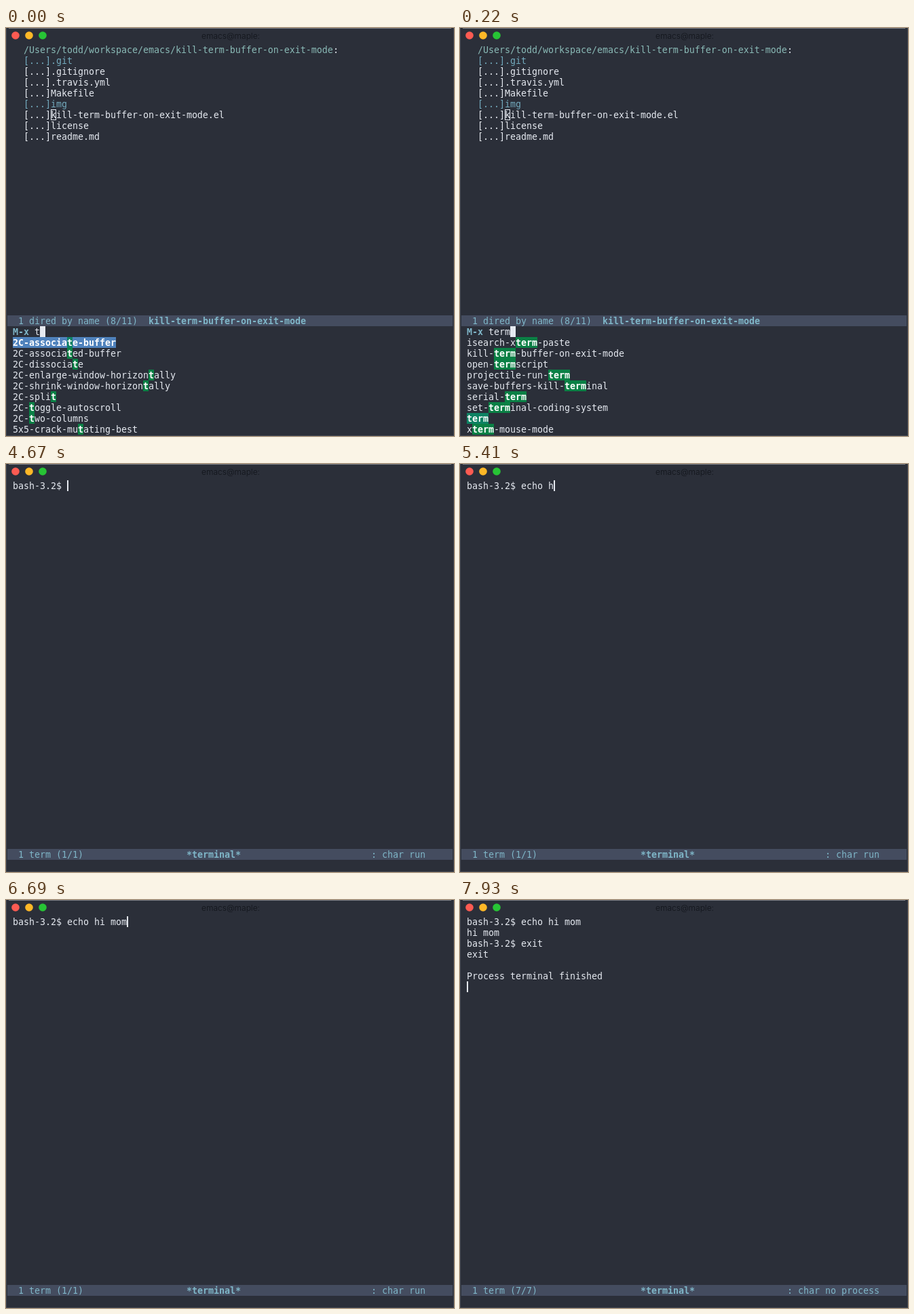
These frames come from a looping animation (660x602 px, 8 s). An HTML page with a canvas:

```html
<!DOCTYPE html>
<html lang="en">
<head>
<meta charset="utf-8">
<title>Terminal session</title>
<style>
html, body { margin: 0; width: 660px; height: 602px; overflow: hidden; background: #2b2f39; }
canvas { display: block; }
</style>
</head>
<body>
<canvas width="660" height="602"></canvas>
<script>
const ctx = document.querySelector('canvas').getContext('2d');
const BG = '#2b2f39', BAR = '#444c5f', FG = '#e5e9f0', BLUE = '#7fb6c8', DIR = '#73aabd',
  PATH = '#8abab6', MATCH = '#0a8045', SELECT = '#4f82bc', WHITE = '#ffffff';
const CELL = 8, LINE = 16;
const MODE = 'kill-term-buffer-on-exit-mode';
const PROMPT = 'bash-3.2$ ';

const px = col => 10 + col * CELL;
const py = row => 24 + row * LINE;

function rect(x, y, w, h, color) {
  ctx.fillStyle = color;
  ctx.fillRect(x, y, w, h);
}

function text(col, row, str, color = FG, bold = false) {
  ctx.font = (bold ? 'bold ' : '') + '13.29px "DejaVu Sans Mono", monospace';
  ctx.fillStyle = color;
  ctx.fillText(str, px(col), py(row) + 13);
}

const block = (col, row, n, color) => rect(px(col), py(row), n * CELL, LINE, color);
const barCursor = (col, row) => rect(px(col), py(row), 2, LINE, FG);
const modeBar = row => rect(2, py(row), 656, LINE, BAR);

function frame() {
  rect(0, 0, 660, 602, BG);
  rect(0, 0, 1, 602, '#434750');
  rect(659, 0, 1, 602, '#434750');
  rect(0, 601, 660, 1, '#434750');
  rect(4, 0, 652, 1, '#7b7e84');
  ['#fc5b52', '#fdb827', '#27c435'].forEach((color, i) => {
    ctx.fillStyle = color;
    ctx.beginPath();
    ctx.arc(14 + 20 * i, 11, 5.8, 0, 7);
    ctx.fill();
  });
  ctx.font = '300 12px Inter, sans-serif';
  ctx.fillStyle = '#11141a';
  ctx.fillText('emacs@maple:', 288, 16);
}

function dired(barRow) {
  const path = '/Users/todd/workspace/emacs/' + MODE;
  text(2, 0, path, PATH);
  text(2 + path.length, 0, ':');
  ['.git', '.gitignore', '.travis.yml', 'Makefile', 'img', MODE + '.el', 'license', 'readme.md']
    .forEach((name, i) => text(2, i + 1, '[...]' + name, i % 4 ? FG : DIR));
  ctx.strokeStyle = FG;
  ctx.lineWidth = 1;
  ctx.strokeRect(66.5, 120.5, 7, 15);
  modeBar(barRow);
  text(1, barRow, '1 dired by name (8/11)', BLUE);
  text(25, barRow, MODE, BLUE, true);
}

function command(query, names, selected) {
  dired(25);
  text(0, 26, 'M-x', BLUE, true);
  text(4, 26, query);
  block(4 + query.length, 26, 1, FG);
  names.forEach((name, i) => {
    const row = 27 + i, at = name.indexOf(query), end = at + query.length, on = i === selected;
    if (on) block(0, row, name.length, SELECT);
    block(at, row, query.length, on ? '#0d8263' : MATCH);
    text(0, row, name.slice(0, at), on ? WHITE : FG, on);
    text(at, row, query, WHITE, true);
    text(end, row, name.slice(end), on ? WHITE : FG, on);
  });
}

function runPrompt() {
  dired(33);
  block(0, 34, 1, FG);
  text(0, 34, 'R', BG, true);
  text(1, 34, 'un program:', BLUE, true);
  text(13, 34, '/bin/bash');
}

function terminal(lines, state = ': char run') {
  const last = lines.length - 1;
  lines.forEach((line, i) => text(0, i, line));
  barCursor(lines[last].length, last);
  modeBar(34);
  text(1, 34, `1 term (${last + 1}/${last + 1})`, BLUE);
  text(32, 34, '*terminal*', BLUE, true);
  text(76 - state.length, 34, state, BLUE);
}

const T_NAMES = ['2C-associate-buffer', '2C-associated-buffer', '2C-dissociate',
  '2C-enlarge-window-horizontally', '2C-shrink-window-horizontally', '2C-split',
  '2C-toggle-autoscroll', '2C-two-columns', '5x5-crack-mutating-best'];
const TER_NAMES = ['ansi-term', 'center-line', 'center-paragraph', 'center-region',
  'checkdoc-interactive', 'checkdoc-message-interactive', 'describe-character-set',
  'find-alternate-file', 'find-alternate-file-other-window'];
const TERM_NAMES = ['isearch-xterm-paste', MODE, 'open-termscript', 'projectile-run-term',
  'save-buffers-kill-terminal', 'serial-term', 'set-terminal-coding-system', 'term',
  'xterm-mouse-mode'];

const ECHO = PROMPT + 'echo hi mom';
const echo = n => () => terminal([ECHO.slice(0, PROMPT.length + n)]);
const exit = n => () => terminal([ECHO, 'hi mom', PROMPT + 'exit'.slice(0, n)]);

const scenes = [
  [0, () => command('t', T_NAMES, 0)],
  [160, () => command('ter', TER_NAMES, 0)],
  [220, () => command('term', TERM_NAMES, 7)],
  [2640, runPrompt],
  [4670, echo(0)], [4830, echo(2)], [4910, echo(4)],
  [5340, echo(5)], [5410, echo(6)],
  [6000, echo(7)], [6100, echo(9)], [6200, echo(10)], [6690, echo(11)],
  [7310, exit(0)], [7490, exit(1)], [7630, exit(2)], [7720, exit(3)],
  [7930, () => terminal([ECHO, 'hi mom', PROMPT + 'exit', 'exit', '',
    'Process terminal finished', ''], ': char no process')],
];

function draw() {
  const t = performance.now() % 8000;
  frame();
  scenes.findLast(([start]) => start <= t)[1]();
  requestAnimationFrame(draw);
}
draw();
</script>
</body>
</html>
```
